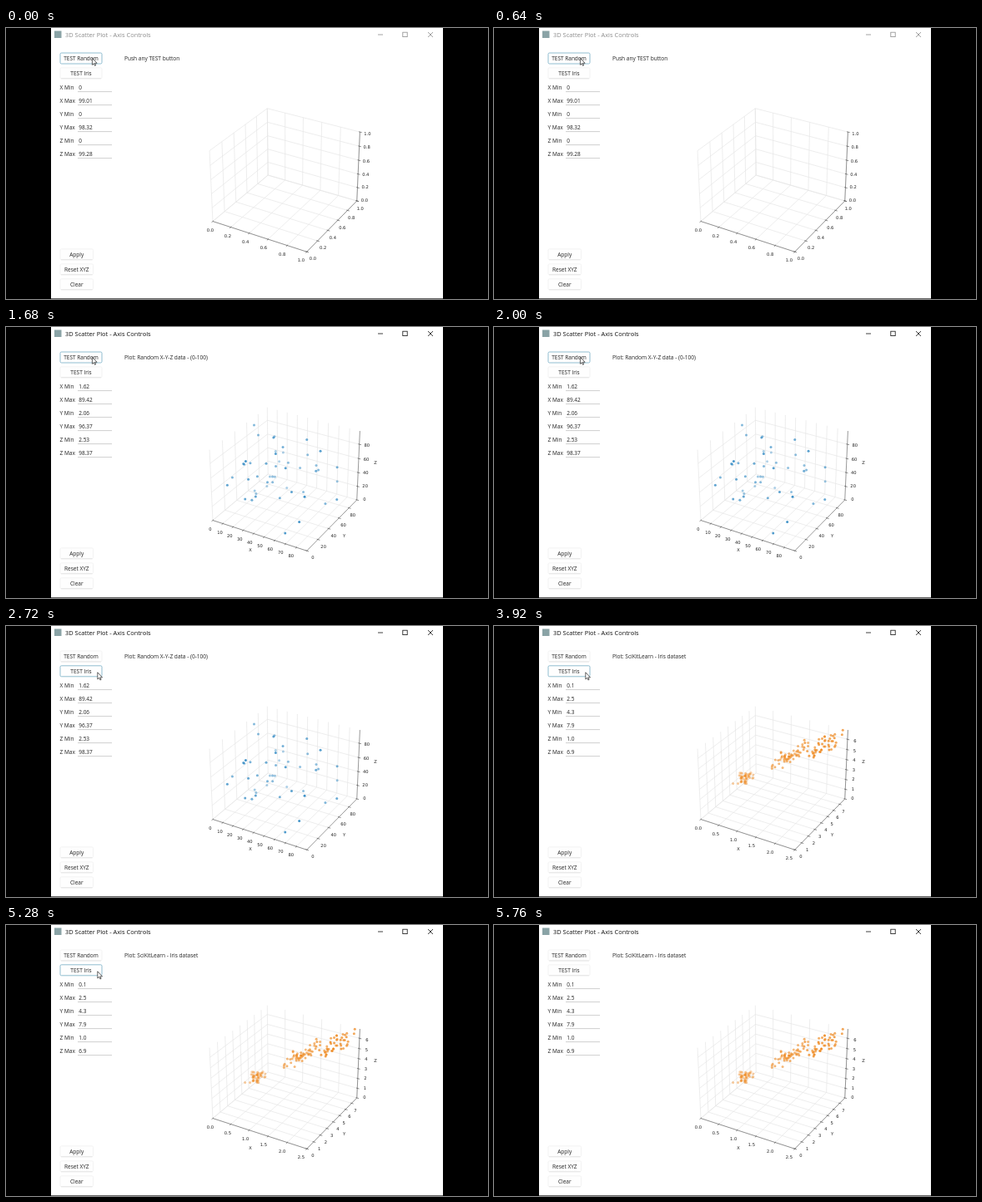
An HTML page with a canvas for the animation above (6.16 s loop, 578 px wide and 326 px high).

```html
<!DOCTYPE html>
<html lang="en">
<head>
<meta charset="utf-8">
<title>3D Scatter Plot</title>
<style>
  html, body { margin: 0; width: 100%; height: 100%; overflow: hidden; background: #000; }
  canvas { display: block; width: 578px; height: 326px; }
</style>
</head>
<body>
<canvas id="stage"></canvas>
<script>
const W = 578, H = 326, LOOP = 6160;
const UI = '"Open Sans", sans-serif', PLOT = '"DejaVu Sans", sans-serif';
const canvas = document.getElementById('stage');
const ctx = canvas.getContext('2d');
const dpr = window.devicePixelRatio || 1;
canvas.width = W * dpr;
canvas.height = H * dpr;

let seed = 20231117;
const rand = () => (seed = (seed * 16807) % 2147483647) / 2147483647;
const gauss = () => Math.sqrt(-2 * Math.log(rand())) * Math.cos(2 * Math.PI * rand());
const clamp = (v, lo, hi) => Math.min(hi, Math.max(lo, v));
const repeat = (count, make) => Array.from({ length: count }, (_, i) => make(i));

// One flower species: measurements share a common size factor, recorded to one decimal
function species(means, deviations, correlation) {
  const own = Math.sqrt(1 - correlation ** 2);
  return repeat(50, () => {
    const size = gauss() * correlation;
    return means.map((mean, k) => {
      const value = mean + deviations[k] * (size + own * gauss());
      return clamp(Math.round(value * 10) / 10, .1, irisMax[k]) / irisMax[k];
    });
  });
}
const irisMax = [2.5, 7.9, 6.9];

// axes: [maximum, tick step, decimals] for x, y, z; dots lie in the unit box
const scenes = {
  empty: {
    caption: 'Push any TEST button',
    values: ['0', '99.01', '0', '98.32', '0', '99.28'],
    axes: [[1, .2, 1], [1, .2, 1], [1, .2, 1]],
    dots: []
  },
  random: {
    caption: 'Plot: Random X-Y-Z data - (0-100)',
    values: ['1.62', '89.42', '2.06', '96.37', '2.53', '98.37'],
    axes: [[89.42, 10, 0], [96.37, 20, 0], [98.37, 20, 0]],
    color: '#1f7fbe',
    dots: repeat(50, () => repeat(3, () => .02 + .98 * rand()))
  },
  iris: {
    caption: 'Plot: SciKitLearn - Iris dataset',
    values: ['0.1', '2.5', '4.3', '7.9', '1.0', '6.9'],
    axes: [[irisMax[0], .5, 1], [irisMax[1], 1, 0], [irisMax[2], 1, 0]],
    color: '#ee8a22',
    dots: [
      ...species([.25, 5, 1.46], [.1, .35, .17], .5),
      ...species([1.33, 5.94, 4.26], [.2, .52, .47], .87),
      ...species([2.03, 6.59, 5.55], [.27, .64, .55], .75)
    ]
  }
};

function text(str, x, y, size, color = '#222', align = 'left', font = UI) {
  ctx.font = `${size}px ${font}`;
  ctx.fillStyle = color;
  ctx.textAlign = align;
  ctx.fillText(str, x, y);
}

function line(points, color, width) {
  ctx.beginPath();
  points.forEach(p => ctx.lineTo(p[0], p[1]));
  ctx.strokeStyle = color;
  ctx.lineWidth = width;
  ctx.stroke();
}

function button(label, y, width, focused) {
  ctx.beginPath();
  ctx.roundRect(65, y, width, 13, 1.5);
  ctx.fillStyle = '#fefefe';
  ctx.fill();
  ctx.strokeStyle = focused ? '#74adc4' : '#f0f0f0';
  ctx.lineWidth = .8;
  ctx.stroke();
  if (!focused) line([[66, y + 13], [64 + width, y + 13]], '#dcdcdc', .7);
  text(label, 65 + width / 2, y + 8.8, 6.5, '#222', 'center');
}

// Perspective view of the unit box: elevation 30, azimuth -60, aspect 4:4:3
function project([a, b, c]) {
  const x = (a - .5) * 1.1429, y = (b - .5) * 1.1429, z = (c - .5) * .8571;
  const depth = 10 - .433 * x + .75 * y - .5 * z, scale = 1130 / depth;
  return [335.9 + scale * (.866 * x + .5 * y), 179 - scale * (-.25 * x + .433 * y + .866 * z), depth];
}
const path = (points, color, width) => line(points.map(project), color, width);

// Label offsets run from the start of each axis to its end
const axisKinds = [
  { at: t => [t, 0, 0], grid: t => [[t, 0, 0], [t, 1, 0], [t, 1, 1]],
    tick: (t, d) => [t, -d, 0], from: [-3, 10.3], to: [-6.8, 10.3], name: ['X', 293, 270] },
  { at: t => [1, t, 0], grid: t => [[1, t, 0], [0, t, 0], [0, t, 1]],
    tick: (t, d) => [1 + d, t, 0], from: [7.3, 7.8], to: [4, 9], name: ['Y', 405.5, 253] },
  { at: t => [1, 1, t], grid: t => [[0, 0, t], [0, 1, t], [1, 1, t]],
    tick: (t, d) => [1 + d, 1, t], from: [9.2, -1], to: [9, 1.9], name: ['Z', 443, 165] }
];

function drawDots({ dots, color }) {
  const spots = dots.map(project);
  const depths = spots.map(spot => spot[2]);
  const near = Math.min(...depths), far = Math.max(...depths);
  ctx.fillStyle = color;
  for (const [x, y, depth] of spots) {
    ctx.globalAlpha = .85 - .5 * (depth - near) / (far - near);
    ctx.beginPath();
    ctx.arc(x, y, 1.5, 0, 2 * Math.PI);
    ctx.fill();
  }
  ctx.globalAlpha = 1;
}

function drawPlot(scene) {
  const ticks = scene.axes.map(([max, step]) =>
    repeat(Math.floor(max / step + 1e-6) + 1, i => i * step / max));
  axisKinds.forEach((kind, k) => ticks[k].forEach(t => path(kind.grid(t), '#e6e6e6', .7)));

  axisKinds.forEach((kind, k) => {
    const [max, , decimals] = scene.axes[k];
    path([kind.at(0), kind.at(1)], '#555', .6);
    ticks[k].forEach(t => {
      path([kind.tick(t, -.011), kind.tick(t, .02)], '#444', .6);
      const [x, y] = project(kind.at(t));
      const [dx, dy] = kind.from.map((v, i) => v + (kind.to[i] - v) * t);
      text((t * max).toFixed(decimals), x + dx, y + dy + 1.9, 5.2, '#222', 'center', PLOT);
    });
    if (scene !== scenes.empty) text(...kind.name, 5.2, '#222', 'center', PLOT);
  });
  drawDots(scene);
}

function drawTitleBar(active) {
  const color = active ? '#111' : '#8c8c8c';
  ctx.fillStyle = '#8aa3a6';
  ctx.fillRect(58, 3.5, 8.5, 8.5);
  text('3D Scatter Plot - Axis Controls', 71, 11, 7.45, color);
  line([[446, 8], [452, 8]], color, .8);
  ctx.strokeRect(475.8, 5.2, 5.4, 5.4);
  line([[506, 5], [512, 11]], color, .8);
  line([[512, 5], [506, 11]], color, .8);
}

function drawCursor(x, y) {
  ctx.save();
  ctx.translate(x, y);
  const arrow = new Path2D('M0 0V8.2L1.9 6.5 3.1 9.2 4.3 8.7 3.1 6.1H5.7Z');
  ctx.fillStyle = '#fff';
  ctx.fill(arrow);
  ctx.strokeStyle = '#222';
  ctx.lineWidth = .7;
  ctx.stroke(arrow);
  ctx.restore();
}

function draw(time) {
  const scene = time < 1680 ? scenes.empty : time < 3920 ? scenes.random : scenes.iris;
  const onRandom = time < 2720, onIris = !onRandom && time < 5760;

  ctx.setTransform(dpr, 0, 0, dpr, 0, 0);
  ctx.fillStyle = '#000';
  ctx.fillRect(0, 0, W, H);
  ctx.fillStyle = '#fff';
  ctx.fillRect(54, 0, 470, 325.4);

  drawTitleBar(scene !== scenes.empty);
  button('TEST Random', 30, 50, onRandom);
  button('TEST Iris', 47.8, 50, onIris);
  ['X Min', 'X Max', 'Y Min', 'Y Max', 'Z Min', 'Z Max'].forEach((label, i) => {
    const y = 74 + 16 * i;
    text(label, 64.5, y, 6.5);
    text(scene.values[i], 87.2, y, 6.5);
    line([[86, y + 2.6], [127, y + 2.6]], '#bcbcbc', .7);
  });
  button('Apply', 265.8, 39.5);
  button('Reset XYZ', 283.8, 39.5);
  button('Clear', 301.8, 39.5);
  text(scene.caption, 142, 39.2, 6.55);

  drawPlot(scene);
  if (onRandom) drawCursor(103.4, 36.2);
  if (onIris) drawCursor(109.8, 55.8);
}

function tick() {
  draw(performance.now() % LOOP);
  requestAnimationFrame(tick);
}
tick();
</script>
</body>
</html>
```
